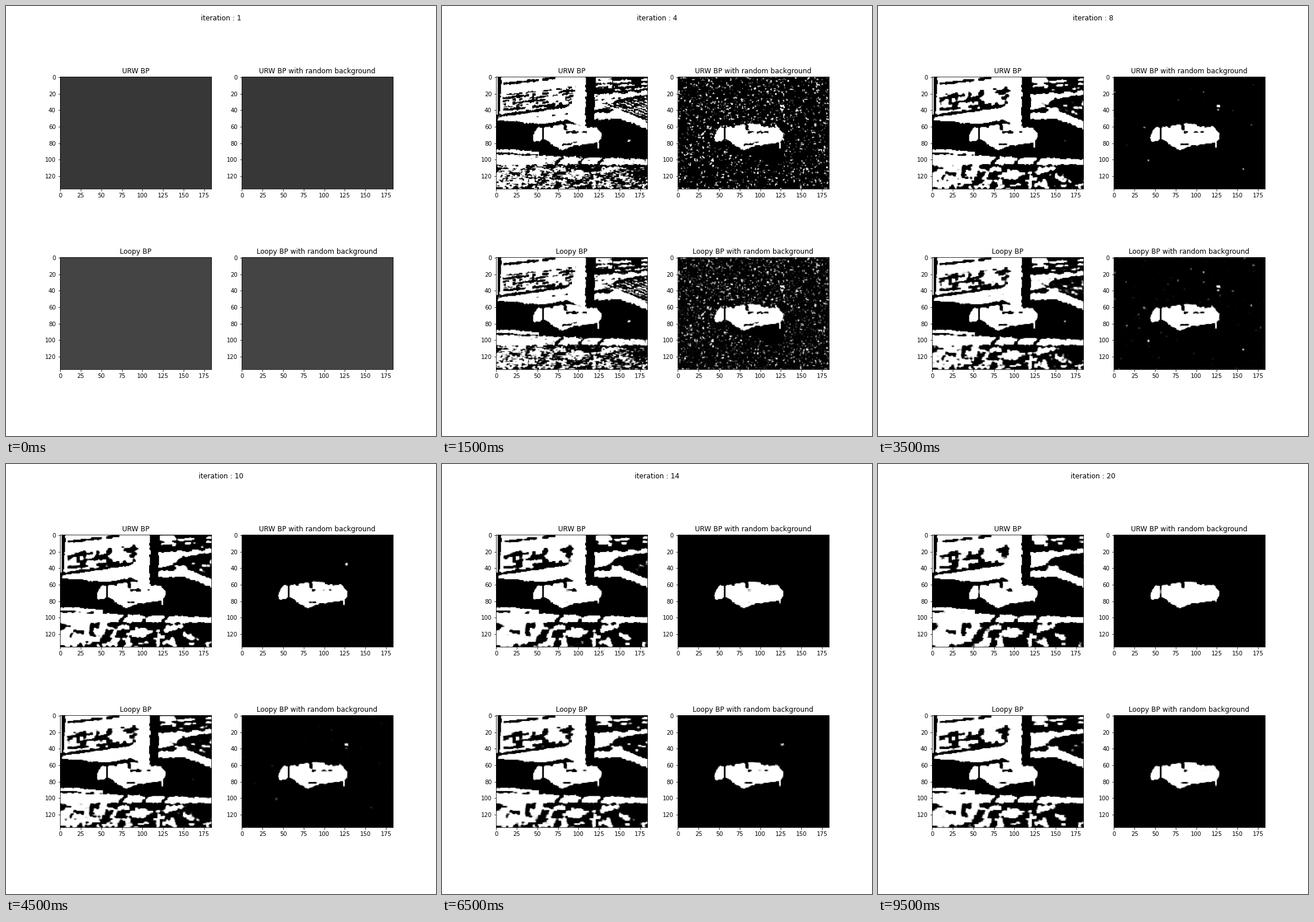
Recreate the animation shown at these times as a matplotlib script. Size 748 by 748 pixels, loop 10000 ms.

```python
import numpy as np
import matplotlib.pyplot as plt
from matplotlib.animation import FuncAnimation

ROWS, COLS, STEPS = 136, 184, 20
FIELD = 2.26      # log-odds of the observed label
COUPLING = 2.5    # pull between neighbouring pixels
DAMPING = 0.64
SIZE, DPI = 748, 72
rng = np.random.default_rng(7)


def blur(a, ry, rx):
    for axis, r in ((0, ry), (1, rx)):
        a = sum(np.roll(a, k, axis) for k in range(-r, r + 1)) / (2 * r + 1)
    return a


def soft_noise(ry, rx):
    a = blur(rng.standard_normal((ROWS, COLS)), ry, rx)
    return a / a.std()


# Slightly wobbly coordinates give every edge a rough outline.
yy, xx = np.mgrid[:ROWS, :COLS].astype(float)
X = xx + 0.5 * soft_noise(1, 1)
Y = yy + 0.5 * soft_noise(1, 1)


def between(xs, tops, bottoms):
    inside = (X >= xs[0]) & (X <= xs[-1])
    return inside & (Y >= np.interp(X, xs, tops)) & (Y <= np.interp(X, xs, bottoms))


def box(x0, y0, x1, y1):
    return (xx >= x0) & (xx < x1) & (yy >= y0) & (yy < y1)


def stripe(x0, x1, y, slope, width, keep=1.0):
    """A straight line starting at (x0, y), broken up at random."""
    dashes = np.repeat(rng.random(COLS // 4), 4) < keep
    near = np.abs(Y - y - slope * (X - x0)) < width / 2
    return near & (X >= x0) & (X <= x1) & dashes


def paint_animal(img):
    img[between((44, 50, 57, 68, 80, 91, 109, 122, 127),
                (72, 61, 61, 60, 57.5, 56.5, 61, 61, 68),
                (78, 78, 74, 82, 89, 84, 81, 79, 75))] = True
    img[box(123, 80, 125, 87)] = True
    img[box(56, 60, 58, 76)] = False
    img[(np.abs(X - 76 - 0.12 * Y) < 1.7) & box(80, 57, 88, 65)] = False
    img[stripe(85, 109, 67, -0.03, 2.4, 0.8)] = False
    img[stripe(80, 98, 82, -0.15, 2.2, 0.8)] = False


def paint_facade(img):
    img[between((2, 56, 86, 108), (-3,) * 4, (52, 57, 52, 61))] = True
    img[(X < 6 - 0.04 * Y) & (X > 1.5) & (Y < 46)] = False
    img[box(0, 0, 2, 46)] = True
    img[stripe(9, 75, 8.5, -0.12, 3, 0.85)] = False
    for k in range(6):
        thick = 3 if k % 2 else 1.7
        img[stripe(8, 96 - k, 22 + 3.6 * k, -0.11, thick, 0.7)] = False
    img[stripe(4, 88, 47, -0.15, 3.4)] = False
    img[stripe(48, 86, 48.5, -0.1, 1.3, 0.5)] = False
    img[(X > 111 - 0.06 * Y) & box(104, 0, 119, 61)] = False


def paint_roof(img):
    wedge = between((128, 150, 184), (35, 29, 24), (38, 42, 55))
    img[wedge & ((Y - 0.38 * X) % 3.4 < 1.4)] = True
    img[between((119, 126, 150, 184), (21, 20.5, 18.5, 16), (41, 38, 26, 22))] = True
    img[between((119, 138, 147, 184), (44, 43, 38, 56), (51, 51, 49.5, 63))] = True
    img[box(121, 1, 141, 14)] = True
    for k in range(3):
        img[stripe(142, 184, 6 + 5 * k, -0.07, 2.8 - 0.6 * k, 0.75)] = True
        img[stripe(120, 142, 4 + 4.5 * k, -0.07, 1.6, 0.6)] = False
        img[stripe(120, 184, 23 + 5 * k, -0.1, 1.3, 0.6)] = False


def paint_ground(img):
    img[stripe(0, 52, 89, 0.06, 4)] = True
    road_top = 93.5 + 0.034 * X
    img[(Y > road_top) & (Y < 107)] = True
    grain = soft_noise(0, 1) + 0.6 * soft_noise(2, 6)
    lean = 0.45 - 0.8 * xx / COLS - 0.3 * (yy > 122)
    grass = Y > 106
    img[grass] = (grain + lean > 0)[grass]
    img[(Y > road_top) & ~grass & (grain < -2)] = False
    img[stripe(70, 184, 107, 0.01, 2.4, 0.9)] = False
    for x in (71, 99, 123):
        img[(np.abs(X - x - 0.9 * (106 - Y)) < 2) & box(x, 95, x + 12, 106)] = False


def full_scene():
    img = np.zeros((ROWS, COLS), bool)
    for paint in (paint_facade, paint_roof, paint_ground, paint_animal):
        paint(img)
    img[stripe(159, 163, 77, -0.1, 2)] = True
    return img


def noisy_scene():
    img = rng.random((ROWS, COLS)) < 0.2
    img[between((64, 96, 110, 128), (82, 82, 80, 78), (88, 96, 106, 104))] = False
    paint_animal(img)
    return img


def propagate(labels, rho, gain, start):
    """Belief images of synchronous, damped message passing on a grid."""
    field = np.where(labels, FIELD, -FIELD)
    moves = ((0, 1), (0, -1), (1, 1), (1, -1))
    msgs = np.zeros((4, ROWS, COLS))
    pull = np.tanh(COUPLING / rho / 2)
    images = [np.full((ROWS, COLS), start)]
    while len(images) < STEPS:
        belief = field + rho * msgs.sum(axis=0)
        images.append(1 / (1 + np.exp(-gain * belief)))
        new = np.empty_like(msgs)
        for i, (axis, step) in enumerate(moves):
            cavity = belief - msgs[i ^ 1]
            sent = 2 * np.arctanh(pull * np.tanh(cavity / 2))
            new[i] = np.roll(sent, step, axis)
            edge = [slice(None)] * 2
            edge[axis] = 0 if step > 0 else -1
            new[i][tuple(edge)] = 0
        msgs = DAMPING * msgs + (1 - DAMPING) * new
    return images


scene, noisy = full_scene(), noisy_scene()
methods = (("URW BP", 0.6, 3, 0.216), ("Loopy BP", 1, 1, 0.267))
panels = [(name + suffix, propagate(labels, *settings))
          for name, *settings in methods
          for suffix, labels in (("", scene), (" with random background", noisy))]

fig, axes = plt.subplots(2, 2, figsize=(SIZE / DPI, SIZE / DPI), dpi=DPI)
views = []
for ax, (title, images) in zip(axes.flat, panels):
    ax.set_title(title)
    views.append(ax.imshow(images[0], cmap="gray", vmin=0, vmax=1))
heading = fig.suptitle("iteration : 1")


def update(i):
    heading.set_text(f"iteration : {i + 1}")
    for view, (_, images) in zip(views, panels):
        view.set_data(images[i])
    return [heading, *views]


anim = FuncAnimation(fig, update, frames=STEPS, interval=500, repeat=True,
                     repeat_delay=0)
plt.show()
```
